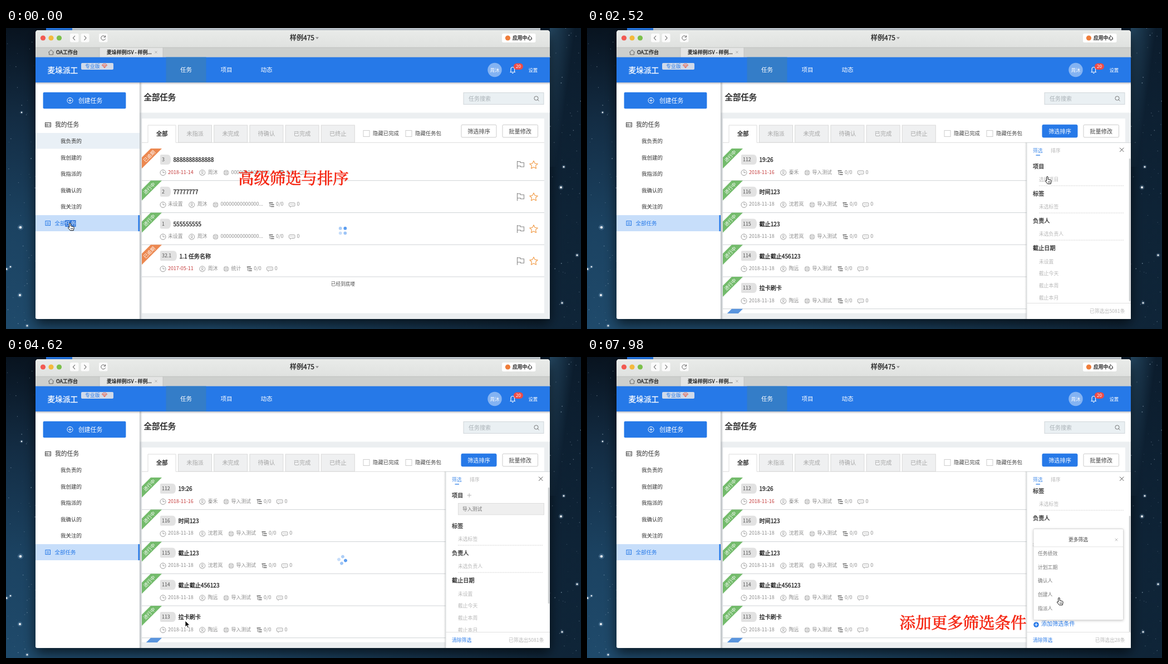
An HTML page that plays this animation: 1033 by 542 pixels, repeating every 8000 ms.

```html
<!DOCTYPE html>
<html>
<head>
<meta charset="utf-8">
<title>任务筛选演示</title>
<style>
html, body { margin: 0; width: 100%; height: 100%; overflow: hidden; background: #0b1826; }
svg { display: block; width: 1033px; height: 542px; }
text { font-family: "Noto Sans CJK SC", "Noto Sans CJK", "Noto Sans", sans-serif; white-space: pre; }
.brush text { font-family: "Kaiti SC", KaiTi, "AR PL UKai CN", "Noto Serif CJK SC", "Noto Sans CJK SC", serif; }
</style>
</head>
<body>
<svg id="stage" viewBox="0 0 1033 542" xmlns="http://www.w3.org/2000/svg"></svg>
<script>
const BLUE = '#2679e8', GREY = '#8c8c8c', PALE = '#b8b8b8', DARK = '#333', RED = '#f5230f';

// Drawing helpers; text is placed by its left edge and vertical centre.
const T = (x, y, size, str, fill = DARK, more = '') =>
  `<text x="${x}" y="${(y + size * .37).toFixed(2)}" font-size="${size}" fill="${fill}" ${more}>${str}</text>`;
// Medium weight: a hairline outline in the text colour.
const M = (x, y, size, str, fill = DARK, more = '', line = .32) =>
  T(x, y, size, str, fill, `stroke="${fill}" stroke-width="${line}" ${more}`);
const R = (x, y, w, h, fill, more = '') =>
  `<rect x="${x}" y="${y}" width="${w}" height="${h}" fill="${fill}" ${more}/>`;
const C = (x, y, r, fill, more = '') => `<circle cx="${x}" cy="${y}" r="${r}" fill="${fill}" ${more}/>`;
const P = (d, stroke, width = 1, fill = 'none', more = '') =>
  `<path d="${d}" stroke="${stroke}" stroke-width="${width}" fill="${fill}" ${more}/>`;
const G = (id, body) => `<g id="${id}">${body}</g>`;
const at = (x, y, body) => `<g transform="translate(${x} ${y})">${body}</g>`;
const mid = 'text-anchor="middle"';
const cross = (x, y, r, col, w = 1) => P(`M${x - r} ${y - r}l${2 * r} ${2 * r}m0 ${-2 * r}l${-2 * r} ${2 * r}`, col, w);
const lens = (x, y, r, col) => C(x, y, r, 'none', `stroke="${col}"`) + P(`M${x + r * .7} ${y + r * .7}l${r * .7} ${r * .7}`, col);

// Approximate advance of a string.
const em = { '-': .347, '.': .278, '/': .39 };
const width = (str, size) => [...str].reduce((n, c) => n + (c > '\u2e80' ? 1 : em[c] || .555), 0) * size;

function sky() {
  let seed = 11, out = R(0, 0, 1033, 542, 'url(#sky)') + R(0, 0, 1033, 542, 'url(#dusk)') + R(977, 0, 56, 250, 'url(#glow)');
  const rnd = () => (seed = (seed * 16807) % 2147483647) / 2147483647;
  for (let i = 0; i < 120; i++) {
    const x = i % 2 ? 977 + rnd() * 56 : rnd() * 53;
    out += C(x.toFixed(1), (rnd() * 542).toFixed(1), (.3 + rnd() * .6).toFixed(2), '#b9cfe2', `opacity="${(.2 + rnd() * .5).toFixed(2)}"`);
  }
  [[26, 359, 2.3], [25, 481, 2], [8, 430, 1.3], [1, 434, 1.6], [38, 536, 1.5], [997, 287, 2], [1002, 250, 1.5],
   [999, 495, 1.5], [1026, 409, 1.6], [28, 152, 1.2]].forEach(([x, y, r]) => {
    out += C(x, y, r * 2.2, '#8fb7dc', 'opacity=".25"') + C(x, y, r, '#f3f6f8');
  });
  return out;
}

function chrome() {
  const box = (x, w) => R(x, 10, w, 15.5, '#fbfbfb', 'rx="2.5"');
  return R(72, 0, 888, 6, '#c9d2da') + R(72, 0, 47, 6, BLUE) +
    R(53, 4, 924, 520, '#fff', 'rx="5" filter="url(#cast)"') +
    P('M53 36V9q0-5 5-5H972q5 0 5 5V36z', 'none', 0, 'url(#bar)') +
    C(66.5, 18, 4.6, '#f25a52') + C(81, 18, 4.6, '#f4b93c') + C(95.5, 18, 4.6, '#7cc04b') +
    box(115, 15.5) + box(134.5, 15) + box(167, 15.5) +
    P('M124 14l-3.5 4 3.5 4M140.5 14l3.5 4-3.5 4', '#666', 1.1) +
    P('M178.3 16a4 4 0 1 0 .3 3M178.6 13.5v3h-3', '#666') +
    M(510, 18, 12, '样例475', '#222') + P('M556 16.5h6l-3 3.5z', 'none', 0, '#888') +
    R(891, 10, 60.5, 16, '#fff', 'rx="2.5"') + C(901.5, 18, 4.6, '#ef7d3a') + M(910, 18, 8.8, '应用中心', '#222') +
    R(53, 35, 924, 18, '#cdcfcd') + R(168, 35, 114, 18, '#e4e5e4') + P('M53 35.2H977M168 35v18M282 35v18', '#bcbebc', .8) +
    P('M76 44l5-4.5 5 4.5M77.5 43.5v4.5h7v-4.5', '#666') + M(90, 44, 9, 'OA工作台', '#222') +
    M(181, 44, 8.9, '麦垛样例ISV - 样例...', '#222') + cross(269.5, 43.5, 2, '#999', .8);
}

function header() {
  return R(53, 98, 924, 4, 'url(#under)') + R(53, 52.6, 924, 45.4, BLUE) + R(287.5, 52.6, 72, 45.4, '#347dc8') +
    M(74.5, 75.5, 13.7, '麦垛派工', '#fff') +
    R(135, 63, 58, 12, '#d0daea', 'rx="2"') + T(142, 69, 8.9, '专业版', BLUE) +
    P('M172.5 67l2-2.5h5l2 2.5-4.5 5zM172.5 67h9M175 67l2 4 2-4', '#e8604c', .9) +
    T(313, 75.5, 10.6, '任务', '#fff') + T(385.5, 75.5, 10.6, '项目', '#fff') + T(457.5, 75.5, 10.6, '动态', '#fff') +
    C(878, 75.5, 12.7, '#84b3f2') + T(878, 75.5, 8.4, '周沐', '#fff', mid) +
    P('M905.5 79.5h9.5M907 79v-4.5q0-4 3.3-4t3.3 4v4.5M909 81.5h2.6', '#fff', 1.1) +
    R(912, 63.5, 17, 11.5, '#ee4b46', 'rx="5.7"') + T(920.5, 69.2, 8.2, '20', '#fff', mid) +
    T(938.5, 75.5, 8.4, '设置', '#fff');
}

function sidebar() {
  const items = ['我负责的', '我创建的', '我指派的', '我确认的', '我关注的'];
  return R(53, 98, 187, 426, '#fff', 'rx="3"') + R(240, 98, 5, 426, 'url(#edge)') +
    R(66.6, 115.7, 148.8, 29.6, BLUE, 'rx="2"') + C(115, 130.5, 5, 'none', 'stroke="#fff"') +
    P('M112.2 130.5h5.6M115 127.7v5.6', '#fff') + T(130, 130.8, 10.8, '创建任务', '#fff') +
    R(70.5, 170.5, 10, 7.5, 'none', 'stroke="#444"') + P('M72 173h3v3h-3zM77 173h2.5M77 175.5h2.5', '#444', .9) +
    T(88, 174.3, 10.8, '我的任务') + G('hover', R(53, 189, 187, 28.5, '#e9f0f6')) +
    items.map((s, i) => T(98, 203.5 + i * 29.6, 9.5, s)).join('') +
    R(53, 337, 187, 29, '#c7defa') + R(237.5, 337, 2.5, 29, BLUE) +
    R(71, 347.5, 8.5, 8, 'none', `stroke="${BLUE}"`) + P('M73 350h4.5M73 351.7h4.5M73 353.5h4.5', BLUE, .7) +
    T(87.5, 351.8, 9.5, '全部任务', BLUE) +
    G('picked', R(106.3, 346, 19.2, 11.8, '#2c73d8') + T(106.5, 351.8, 9.5, '任务', '#d8e8fb'));
}

function toolbar() {
  const tabs = ['未指派', '未完成', '待确认', '已完成', '已终止'];
  const check = (x, s) => R(x, 184.5, 11, 11, '#fff', 'stroke="#ccc"') + T(x + 17, 190, 9.4, s, '#444');
  return M(247.5, 124.5, 14.4, '全部任务', '#222', '', .4) +
    R(822, 116.5, 144, 21, '#eaf0f3', 'stroke="#d0d6da"') + T(831, 127.5, 10, '任务搜索', '#a9b1b6') + lens(952.5, 126.5, 3.6, '#777') +
    P('M244 206.3H255V175H305V206.3H967', '#dcdcdc') + M(280.3, 190.5, 10.2, '全部', '#222', mid) +
    tabs.map((s, i) => {
      const x = 309.5 + i * 64.2;
      return R(x, 175, 60, 31, '#eff0f1', 'stroke="#d9d9d9"') + T(x + 30, 190.5, 10.2, s, '#a6a6a6', mid);
    }).join('') + check(642, '隐藏已完成') + check(718, '隐藏任务包') +
    R(818, 174.3, 63, 22.6, '#fff', 'id="filter" stroke="#ccc" rx="2"') + T(849.5, 186, 10.2, '筛选排序', '#444', mid + ' id="filterText"') +
    R(892, 174.3, 63.5, 22.6, '#fff', 'stroke="#ccc" rx="2"') + T(923.7, 186, 10.2, '批量修改', '#444', mid);
}

const star = [...Array(10).keys()].map(i => {
  const r = i % 2 ? 3.7 : 7.6, a = i * Math.PI / 5;
  return (i ? 'L' : 'M') + (r * Math.sin(a)).toFixed(1) + ' ' + (-r * Math.cos(a)).toFixed(1);
}).join('') + 'z';
const ribbon = col => P('M16 0H36L0 36V16z', 'none', 0, col);

// Small grey symbols of the task rows.
const ink = '#999';
const clock = C(0, 0, 5, 'none', `stroke="${ink}"`) + P('M0-3v3h3', ink);
const person = C(0, 0, 5, 'none', `stroke="${ink}" stroke-width=".9"`) + C(0, -1.2, 1.7, 'none', `stroke="${ink}" stroke-width=".8"`) + P('M-3 3.5q3-4 6 0', ink, .8);
const sheet = C(0, 0, 4.8, 'none', 'stroke="#bbb" stroke-width=".7"') + R(-3, -3, 6, 6, 'none', `stroke="${ink}" stroke-width=".8"`) + P('M-1.6-1h3.2M-1.6 1h3.2', ink, .8);
const tree = P('M-4.5-3.5h7M-1-.2h5.500M-1 3.2h5.500', '#666', 1.5) + P('M-3-3v6.200h2M-3-.2h2', '#777', .8);
const bubble = P('M-4-3.5h8.5q1 0 1 1v4q0 1-1 1h-5l-2 2v-2h-1.500q-1 0-1-1v-4q0-1 1-1z', ink, .9) + P('M-2.500-.5h1M-.2-.5h1M2.200-.5h1', ink, 1.2);

function row(i, [num, title, date, who, project]) {
  const late = /-1[14]$/.test(date), hot = late || date.endsWith('-16'), s = 8.9;
  const badge = { 1: 19, 3: 28, 4: 30 }[num.length];
  let x = 47, out = ribbon(late ? '#ec8850' : '#73bb6b') +
    `<text transform="translate(13.5 14) rotate(-45)" y="3" font-size="8.6" fill="#fff" ${mid}>${late ? '已逾期' : '进行中'}</text>` +
    P(`M35 11h${badge - 8}q6 0 6 9t-6 9h-${badge - 8}q-2 0-2-2v-14q0-2 2-2z`, 'none', 0, '#e2e2e2') +
    T(36, 19.8, s, num, '#555') + M(badge + 37.5, 20.5, 10.1, title, '#222');
  const part = (icon, str, iconX, textX, col = GREY) => {
    out += at(x + iconX, 43.5, icon) + T(x + textX, 42.3, s, str, col);
    x += textX + width(str, s);
  };
  part(clock, date, -9, 0, hot ? '#c43a3a' : GREY);
  part(person, who, 16, 26);
  part(sheet, project, 15, 24);
  part(tree, '0/0', 15, 23);
  part(bubble, '0', 15, 24);
  out += P('M674.5 22.5v14M674.5 23.5h5.5v2h6.5v7.5h-6v-1.5h-6', '#888', 1.1) +
    at(704, 29.8, P(star, '#f2a050', 1.2, 'none', 'stroke-linejoin="round"')) + P('M0 57.7H723', '#cfd3d6');
  return at(244, (217 + i * 57.75).toFixed(1), out);
}

const zeros = '0'.repeat(14) + '...';
const listA = [
  ['3', '8888888888888', '2018-11-14', '周沐', zeros],
  ['2', '77777777', '未设置', '周沐', zeros],
  ['1', '555555555', '未设置', '周沐', zeros],
  ['32.1', '1.1 任务名称', '2017-05-11', '周沐', '统计']];
const listB = [
  ['112', '19:26', '2018-11-16', '秦禾', '导入测试'],
  ['116', '时间123', '2018-11-18', '沈若岚', '导入测试'],
  ['115', '截止123', '2018-11-18', '沈若岚', '导入测试'],
  ['114', '截止截止456123', '2018-11-18', '陶远', '导入测试'],
  ['113', '拉卡刷卡', '2018-11-18', '陶远', '导入测试']];

function lists() {
  return '<g clip-path="url(#card)">' +
    G('before', listA.map((r, i) => row(i, r)).join('') + T(605.5, 461, 8.7, '已经到底喽', '#555', mid)) +
    G('after', listB.map((r, i) => row(i, r)).join('') + at(244, 505.8, ribbon('#5a95de'))) + '</g>';
}

function panel() {
  const head = (y, s) => M(801, y, 10.2, s);
  const item = (y, s, more) => T(812, y, 8.8, s, PALE, more);
  const dash = y => P(`M812 ${y}H964`, '#ccc', .8, 'none', 'stroke-dasharray="2 1"');
  const dates = ['未设置', '截止今天', '截止本周', '截止本月', '自定义'];
  return R(786, 206, 4, 318, 'url(#soft)') + R(790, 206, 188, 318, '#fff') + P('M790 524V206.5H978', '#d5d8da') +
    T(801, 220.5, 8.9, '筛选', '#4a90ea') + R(806.5, 228.3, 7.5, 1.5, '#4a90ea') + T(833, 220.5, 8.9, '排序', PALE) +
    cross(960.7, 219.3, 3.6, '#555') +
    '<g clip-path="url(#view)">' + G('scroll', head(249, '项目') +
      G('empty', item(273, '未选项目', 'id="hint"') + dash(284)) +
      G('chosen', P('M828.5 249h7.5M832.2 245.3v7.5', '#aaa', .9) + R(812.5, 263.5, 154, 20.5, '#efefef', 'stroke="#ddd"') + T(820, 273.8, 8.8, '导入测试', '#777')) +
      G('rest', head(298, '标签') + item(322, '未选标签') + dash(333) + head(347, '负责人') + item(371, '未选负责人') + dash(382) +
        head(396, '截止日期') + dates.map((s, i) => item(i < 4 ? 420.5 + i * 21.6 : 505, s, i === 3 ? 'id="month"' : '')).join('') +
        dash(517.5) + C(807, 539, 4.8, BLUE) + P('M804.3 539h5.4M807 536.3v5.4', '#fff', 1.2) + T(816, 537, 10.1, '添加筛选条件', BLUE))) + '</g>' +
    R(973.8, 235, 2.4, 257, '#c6c9cb', 'id="thumb" rx="1"') +
    P('M790 495.5H977', '#e0e0e0') + T(801, 509.3, 8.8, '清除筛选', BLUE, 'id="clear"') + T(966.5, 509.3, 8.8, '', PALE, 'text-anchor="end" id="count"') +
    G('more', R(802, 309.5, 161.5, 164, '#fff', 'rx="2" stroke="#d8d8d8" filter="url(#drop)"') + T(882.5, 328.3, 8.8, '更多筛选', '#444', mid) +
      cross(951, 329, 2.3, '#aaa', .8) + P('M802 341.8H963', '#e4e4e4') +
      ['任务绩效', '计划工期', '确认人', '创建人', '指派人'].map((s, i) => T(810, 354 + i * 24.6, 8.8, s, '#777')).join(''));
}

function modal() {
  const rows = ['导入测试', '0'.repeat(23), '1'.repeat(14), '导出测试', '项目测试', '更新验证', '项目权限测试一', '统计', '范德萨发', '六二三四五六七八九十'];
  const folder = P('M-5.5-5h4l1.200 1.700h5.800v8.300h-11zM-5.500-1.800h11', '#fff', 1) + P('M-3 .5h1M-.8.5h4M-3 2.700h1M-.8 2.700h4', '#fff', .9);
  const screen = P('M-5.500-4.500h11v7h-11zM0 2.500v2.500M-3 5h6', '#fff', 1.1);
  const ad = R(-5.5, -4, 11, 8, 'none', 'stroke="#fff" stroke-width=".9"') + T(0, 0, 5.5, 'AD', '#fff', mid);
  const pen = P('M-4.500 3.500L3-5l2 2-7 7.500M-4 4.500h5M2 5q4-1 3-5', '#fff', 1.3);
  const isAd = i => i === 4 || i === 8;
  const icon = i => i === 2 ? screen : isAd(i) ? ad : i === 9 ? pen : folder;
  const tint = i => isAd(i) ? '#ee4a41' : i === 9 ? '#6c9cda' : BLUE;
  return R(270, 116.5, 490.5, 389, '#fff', 'rx="3"') + P('M270 149V119.5q0-3 3-3H757.5q3 0 3 3V149z', 'none', 0, '#e9eaed') +
    T(284, 133, 11.4, '选择项目', '#444') + cross(740.3, 133, 3.5, '#444', 1.1) +
    lens(290, 173.5, 5, '#aaa') + T(313, 174.5, 11.5, '项目名称', '#b5b5b5') + P('M515.5 163V488', '#dedede') +
    rows.map((s, i) => {
      const y = 174 + i * 32.45;
      return C(528.8, y - .5, 5.4, '#fff', 'stroke="#ccc"') + C(552.5, y, 11, tint(i)) + at(552.5, y, icon(i)) + T(570, y, 10, s, '#666');
    }).join('') +
    G('radio', C(528.8, 173.5, 5.4, '#fff', `stroke="${BLUE}"`) + C(528.8, 173.5, 3, BLUE)) +
    R(743, 163, 3.5, 325, '#f0f0f0') + R(743, 163, 3.5, 255.5, '#bfc1c3', 'rx="1"') +
    R(283.7, 463.2, 51, 25, BLUE, 'rx="2"') + T(309, 476, 10.2, '确 定', '#fff', mid) +
    R(342, 463.5, 50, 24.5, '#fff', 'rx="2" stroke="#ccc"') + T(367, 476, 10.2, '取 消', '#555', mid);
}

const grad = (id, dir, ...stops) => `<linearGradient id="${id}" x2="${dir[0]}" y2="${dir[1]}">` +
  stops.map(([o, c, a = 1]) => `<stop offset="${o}" stop-color="${c}" stop-opacity="${a}"/>`).join('') + '</linearGradient>';
const clip = (id, ...box) => `<clipPath id="${id}">${R(...box, '#fff')}</clipPath>`;
const shadow = (id, dy, blur, alpha) => `<filter id="${id}" x="-10%" y="-10%" width="120%" height="125%">` +
  `<feDropShadow dx="0" dy="${dy}" stdDeviation="${blur}" flood-opacity="${alpha}"/></filter>`;

document.getElementById('stage').innerHTML = '<defs>' +
  grad('sky', [0, 1], [0, '#08131f'], [.3, '#132c43'], [.65, '#1b4261'], [1, '#1f4a6b']) +
  grad('dusk', [1, 0], [.35, '#0c1e2f', 0], [.97, '#0c1e2f', .85]) +
  grad('glow', [1, .6], [0, '#24465f'], [.6, '#24465f', 0]) +
  grad('bar', [0, 1], [0, '#e9ebe9'], [1, '#dfe1df']) +
  grad('edge', [1, 0], [0, '#8a8f94', .55], [1, '#8a8f94', 0]) +
  grad('under', [0, 1], [0, '#445', .35], [1, '#445', 0]) +
  grad('soft', [1, 0], [0, '#777', 0], [1, '#777', .25]) +
  clip('card', 244, 163, 723, 350.5) + clip('view', 790, 235, 184, 260) + clip('win', 53, 98, 924, 426) +
  shadow('drop', 1, 2, .2) + shadow('cast', 9, 11, .65) + '</defs>' +
  sky() + chrome() +
  '<g clip-path="url(#win)">' + R(240, 98, 737, 54.5, '#fff') + R(240, 152.5, 737, 372, '#eceff1') + R(244, 163, 723, 350.5, '#fff') +
  toolbar() + lists() + sidebar() + G('panel', panel()) + G('shade', R(53, 98, 924, 426, '#081018', 'opacity=".5"')) + '</g>' +
  header() + G('modal', modal()) +
  G('spin', [.5, 1, .6, .35].map((o, i) => C(i % 3 ? 4.3 : -4.3, i < 2 ? -4.3 : 4.3, 2.9, '#5b9df0', `opacity="${o}"`)).join('')) +
  '<g class="brush">' + G('title1', M(417, 270.5, 28.4, '高级筛选与排序', RED, '', .7)) + G('title2', M(561.5, 478, 28.5, '添加更多筛选条件', RED, '', .7)) + '</g>' +
  G('hand', P('M-1.3.8a1.3 1.3 0 0 1 2.6 0V4.6l4.5 1q1.6.5 1.4 2.2l-1 4.800H.4L-3.600 7.600q.2-1.800 2.300-.4zM2 8v2.500M4.300 8v2.500', '#111', 1, '#fff')) +
  G('arrow', P('M0 0v11l2.600-2.400 1.800 4 1.800-.8-1.800-3.900h3.600z', '#fff', .8, '#000'));

// Pointer stops: time, x, y, and whether it is a hand from then on.
const stops = [
  [0, 115, 352, 1], [420, 115, 352, 0], [1080, 838, 184, 1], [1620, 840, 184, 1], [1800, 840, 186, 0],
  [2280, 827, 268, 1], [2700, 827, 268, 0], [3120, 780, 262, 0], [3240, 780, 262, 0], [3660, 529, 172, 1],
  [3840, 529, 172, 0], [4260, 310, 474, 1], [4440, 312, 474, 0], [4620, 322, 475, 0], [4800, 322, 475, 0],
  [5340, 886, 405, 1], [5880, 889, 430, 1], [6180, 889, 438, 1], [6360, 832, 426, 1], [6540, 832, 426, 1],
  [6840, 846, 477, 1], [7020, 846, 477, 1], [7500, 846, 390, 1], [7980, 848, 434, 1], [8000, 848, 434, 1]];

// Loading spells: start, end, x, y.
const spells = [[0, 600, 605, 365], [2910, 3300, 629, 325.5], [4440, 4920, 604, 365.5]];

const el = id => document.getElementById(id);
const ramp = (t, a, b) => Math.min(1, Math.max(0, (t - a) / (b - a)));
const smooth = p => p * p * (3 - 2 * p);
const show = (id, on) => el(id).setAttribute('opacity', +on);
const move = (id, x, y, rest = '') => el(id).setAttribute('transform', `translate(${x} ${y})${rest}`);
const set = (id, key, val) => el(id).setAttribute(key, val);

function draw(t) {
  const open = t >= 1440, chosen = t >= 4440, scroll = 63 * smooth(ramp(t, 5400, 5940));

  show('hover', 1 - ramp(t, 0, 240));
  show('picked', t < 2460);
  show('before', t < 600);
  show('after', t >= 600);
  set('filter', 'fill', open ? BLUE : '#fff');
  set('filter', 'stroke', open ? BLUE : '#ccc');
  set('filterText', 'fill', open ? '#fff' : '#444');

  const slide = 1 - (1 - ramp(t, 1440, 1757)) ** 2;
  move('panel', 187 * (1 - slide), 0);
  show('panel', open ? Math.min(1, slide + .04) : 0);
  el('hint').textContent = t < 2280 ? '未选项目' : '选择项目';
  show('empty', !chosen);
  show('chosen', chosen);
  show('clear', chosen);
  move('rest', 0, chosen ? 6 : 0);
  move('scroll', 0, -scroll);
  set('thumb', 'y', 235 + scroll * .81);
  set('thumb', 'height', chosen ? 209 : 257);
  show('thumb', t >= 1757);
  set('month', 'fill', t >= 6420 ? BLUE : PALE);
  el('count').textContent = `已筛选出${t < 4920 ? 5081 : t < 6600 ? 149 : 28}条`;
  show('more', ramp(t, 6900, 7020));

  const pop = ramp(t, 2640, 2820) * (1 - ramp(t, 4440, 4560)), k = .3 + .7 * smooth(pop);
  show('shade', pop);
  show('modal', pop);
  move('modal', 515 * (1 - k), 311 * (1 - k), ` scale(${k})`);
  show('radio', t >= 3720);

  const spell = spells.find(s => t >= s[0] && t < s[1]);
  show('spin', !!spell);
  if (spell) move('spin', spell[2], spell[3], ` rotate(${(t - spell[0]) * .3})`);
  show('title1', 1 - ramp(t, 1980, 2160));
  show('title2', ramp(t, 7140, 7320));

  const i = stops.findIndex((s, n) => t < stops[n + 1][0]), a = stops[i], b = stops[i + 1];
  const p = smooth(ramp(t, a[0], b[0])), x = a[1] + (b[1] - a[1]) * p, y = a[2] + (b[2] - a[2]) * p;
  move('hand', x, y);
  move('arrow', x, y);
  show('hand', a[3]);
  show('arrow', !a[3]);
}

const start = performance.now();
function tick() {
  const t = (performance.now() - start) % 8000;
  draw(Math.floor(t / 60) * 60);
  requestAnimationFrame(tick);
}
tick();
</script>
</body>
</html>
```
